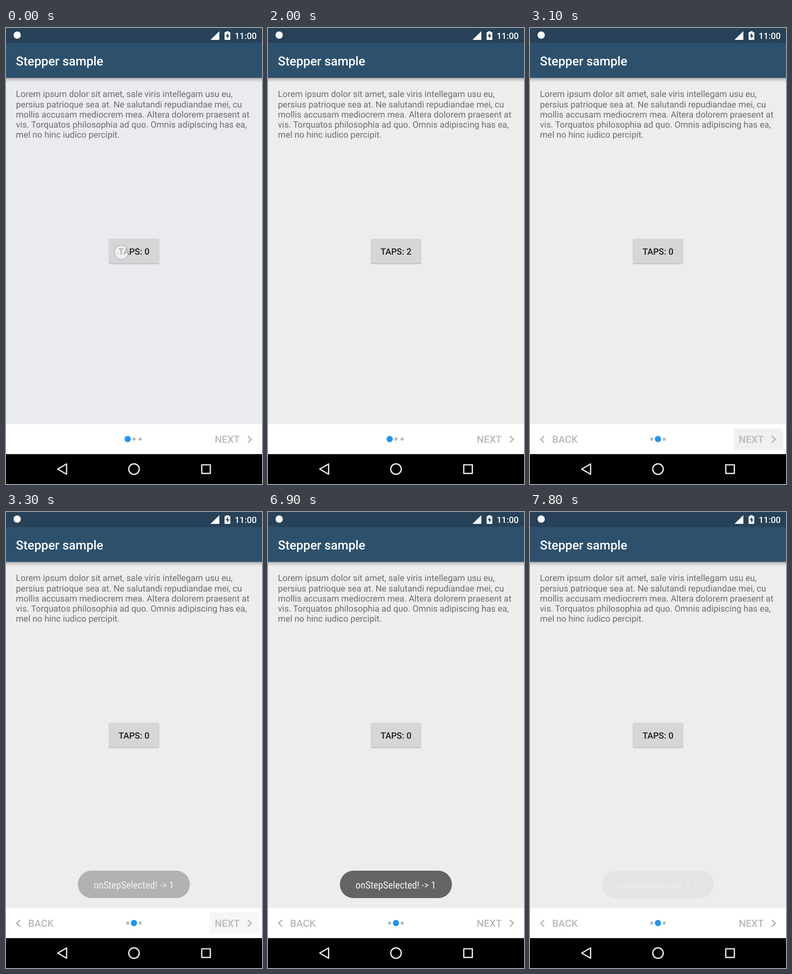
An HTML page that plays this animation: 561x998 px, repeating every 8 s.

```html
<!DOCTYPE html>
<html lang="en">
<head>
<meta charset="utf-8">
<title>Stepper sample</title>
<style>
  html, body { margin: 0; width: 100%; height: 100%; overflow: hidden; background: #000; }
  svg { display: block; width: 100%; height: 100%; font: 19.09px Roboto, sans-serif; }
  text { text-rendering: geometricPrecision; }
  .medium { font-weight: 500; }
  .label { font-size: 21.8px; font-weight: 500; fill: #b9b9b9; }
  .chevron { fill: none; stroke: #b4b4b4; stroke-width: 2.7; }
  .nav { fill: none; stroke: #f2f2f2; stroke-width: 2.7; stroke-linejoin: round; }
  .button { filter: drop-shadow(0 1.2px 1.2px rgba(0, 0, 0, .32)); }
  .toast { font: 21.8px "Roboto Condensed", Roboto, sans-serif; font-stretch: 75%; }
</style>
</head>
<body>
<svg viewBox="0 0 561 998">
  <defs>
    <linearGradient id="shade" x2="0" y2="1">
      <stop offset="0" stop-opacity=".3"/>
      <stop offset=".4" stop-opacity=".13"/>
      <stop offset="1" stop-opacity="0"/>
    </linearGradient>
  </defs>

  <rect width="561" height="998" fill="#ededed"/>
  <rect id="tint" y="109" width="561" height="758" fill="rgb(210,220,255)"/>
  <g id="pages"></g>

  <!-- status bar and app bar -->
  <rect y="109" width="561" height="10" fill="url(#shade)"/>
  <rect width="561" height="109.160" fill="#2d516d"/>
  <rect width="561" height="32.700" fill="#264158"/>
  <g fill="#fff">
    <circle cx="24.500" cy="15.500" r="8"/>
    <path d="M448 26L467.500 7V26Z"/>
    <path d="M479 9h3.500v-2h5.500v2h3.500v17h-12.500z"/>
    <path d="M486.500 10.500l-5 7.500h3.200v5.500l5-7.500h-3.200z" fill="#264158"/>
    <text class="medium" x="501" y="24">11:00</text>
    <text class="medium" x="21.800" y="81.500" font-size="27.270">Stepper sample</text>
  </g>

  <!-- step navigation -->
  <rect y="867" width="561" height="66" fill="#fff"/>
  <rect id="highlight" x="446.500" y="876" width="108.500" height="47.500" rx="2"/>
  <g id="back">
    <path class="chevron" d="M31 893L23.500 900.200L31 907.400"/>
    <text class="label" x="48.500" y="908.300">BACK</text>
  </g>
  <text class="label" x="457.500" y="908.300">NEXT</text>
  <path class="chevron" d="M530 893L537.500 900.200L530 907.400"/>
  <g id="dots">
    <circle cx="266.700" cy="899.700"/>
    <circle cx="280.400" cy="899.700"/>
    <circle cx="294" cy="899.700" r="3.500" fill="#b9b9b9"/>
  </g>

  <!-- system keys -->
  <rect y="932.600" width="561" height="66"/>
  <g class="nav">
    <path d="M113.400 965.400L132.800 954.200V976.600Z"/>
    <circle cx="280.500" cy="965.400" r="11.500"/>
    <rect x="429" y="956" width="18.800" height="18.800"/>
  </g>

  <g id="toast">
    <rect x="157.500" y="785" width="245.500" height="60" rx="30" fill="#646464"/>
    <text class="toast" x="280" y="824" text-anchor="middle" fill="#f5f5f5">onStepSelected! -&gt; 1</text>
  </g>
  <circle id="touch" r="15.500" fill="rgba(255,255,255,.62)" stroke="rgba(135,150,200,.5)" stroke-width="1.800"/>
</svg>

<script>
const LOOP = 8000, STEP = 100, WIDTH = 561;
const $ = id => document.getElementById(id);
const clamp = x => Math.min(1, Math.max(0, x));
const progress = (t, start, duration) => clamp((t - start) / duration);
const easeOut = (x, power) => 1 - (1 - x) ** power;
const mix = (a, b, x) => a + (b - a) * x;

const lines = [
  'Lorem ipsum dolor sit amet, sale viris intellegam usu eu,',
  'persius patrioque sea at. Ne salutandi repudiandae mei, cu',
  'mollis accusam mediocrem mea. Altera dolorem praesent at',
  'vis. Torquatos philosophia ad quo. Omnis adipiscing has ea,',
  'mel no hinc iudico percipit.'
];

const page = index => `<g transform="translate(${index * WIDTH})">
  ${lines.map((line, i) => `<text x="21.8" y="${151.3 + i * 22.2}" fill="#6d6d6d">${line}</text>`).join('')}
  <rect class="button" x="226" y="461.5" width="109" height="53.5" rx="2.5" fill="#d6d6d6"/>
  <text class="medium taps" x="280.5" y="495.8" text-anchor="middle" fill="#1b1b1b">TAPS: 0</text>
</g>`;

$('pages').innerHTML = page(0) + page(1);
const button = document.querySelector('.button');
const taps = document.querySelector('.taps');
const [firstDot, secondDot] = $('dots').children;

function setDot(dot, size, active) {
  dot.setAttribute('r', mix(3.5, 6.9, size));
  dot.setAttribute('fill', active ? '#2196f3' : '#b9b9b9');
}

// Strength of a pressed state: quick rise, hold, linear fade.
const press = (t, down, up, fade) => progress(t, down, 100) * (1 - progress(t, up, fade));

function touchOpacity(t) {
  if (t < 1000) return 1 - progress(t, 200, 200);
  if (t < 2700) return 1 - progress(t, 1000, 200);
  return 1 - progress(t, 2750, 150);
}

function draw(t) {
  const stepped = t >= 2800;

  taps.textContent = 'TAPS: ' + (t < 300 ? 0 : t < 1100 ? 1 : 2);
  const pressed = press(t, 0, 500, 400) + press(t, 1000, 1100, 400);
  const grey = mix(214, 200, pressed);
  button.setAttribute('fill', `rgb(${grey},${grey},${grey})`);

  const scroll = easeOut(progress(t, 2788, 200), 5);
  $('pages').setAttribute('transform', `translate(${-WIDTH * scroll})`);
  $('tint').setAttribute('opacity', 0.12 * (1 - progress(t, 0, 500)));

  const grow = easeOut(progress(t, 2800, 300), 2);
  setDot(firstDot, 1 - grow, !stepped);
  setDot(secondDot, grow, stepped);
  $('back').setAttribute('opacity', stepped ? 1 : 0);
  $('highlight').setAttribute('opacity', 0.06 * press(t, 2788, 3150, 350));

  const shown = easeOut(progress(t, 3180, 500), 2);
  const hidden = progress(t, 7314, 500) ** 2;
  $('toast').setAttribute('opacity', shown - hidden);

  const touch = $('touch');
  touch.setAttribute('opacity', touchOpacity(t));
  touch.setAttribute('transform', t < 2700 ? 'translate(253 491)' : 'translate(487 897.5)');
}

const start = performance.now();
function tick() {
  const t = (performance.now() - start) % LOOP;
  draw(Math.min(Math.floor(t / STEP) * STEP, 7800));
  requestAnimationFrame(tick);
}
tick();
</script>
</body>
</html>
```
